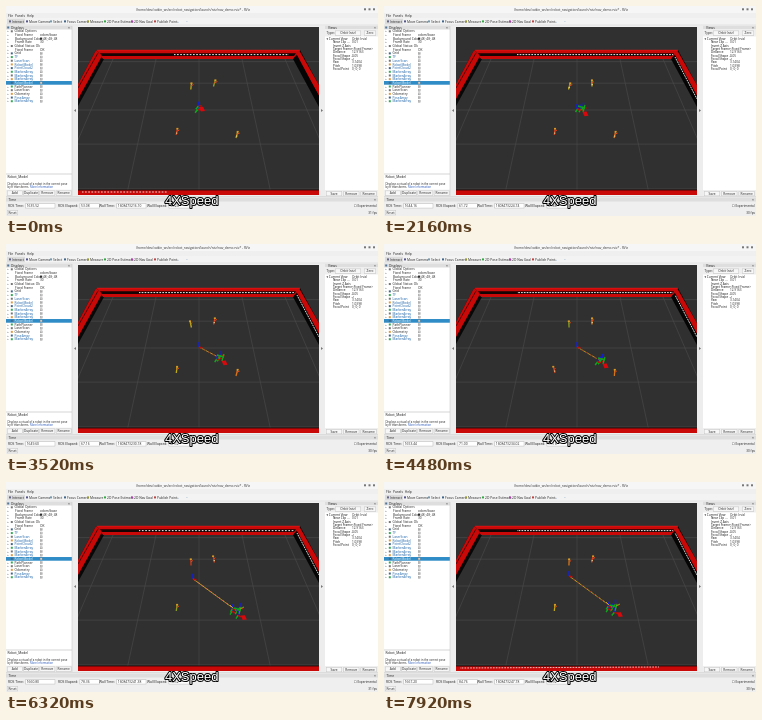
Write an HTML page with a canvas that moves like this. It is 372 px wide and 210 px high and loops after 8 s.

```html
<!DOCTYPE html>
<html lang="en">
<head>
<meta charset="utf-8">
<title>RViz session</title>
<style>
html, body { margin: 0; width: 100%; height: 100%; overflow: hidden; background: #efefef; }
canvas { display: block; width: 372px; height: 210px; }
</style>
</head>
<body>
<canvas id="stage" width="372" height="210"></canvas>
<script>
const ctx = document.getElementById('stage').getContext('2d');
const LOOP = 8000, STEP = 80;
const UI = '"Open Sans", "Noto Sans", sans-serif';
const RED = '#c90808', GREEN = '#10a51c', BLUE = '#1420c8';

function rect(x, y, w, h, color) {
  ctx.fillStyle = color;
  ctx.fillRect(x, y, w, h);
}
function poly(color, ...p) {
  ctx.fillStyle = color;
  ctx.beginPath();
  for (let i = 0; i < p.length; i += 2) ctx.lineTo(p[i], p[i + 1]);
  ctx.fill();
}
function line(x1, y1, x2, y2, color, width = 1, dash = []) {
  ctx.strokeStyle = color;
  ctx.lineWidth = width;
  ctx.setLineDash(dash);
  ctx.beginPath();
  ctx.moveTo(x1, y1);
  ctx.lineTo(x2, y2);
  ctx.stroke();
  ctx.setLineDash([]);
}
function text(s, x, y, color = '#222', size = 3.3, align = 'left') {
  ctx.font = `${size}px ${UI}`;
  ctx.textAlign = align;
  ctx.fillStyle = color;
  ctx.fillText(s, x, y);
}
function button(label, x, y, w) {
  rect(x, y, w, 5, '#c2c2c2');
  rect(x + .5, y + .5, w - 1, 4, '#f7f7f7');
  text(label, x + w / 2, y + 3.6, '#222', 3.2, 'center');
}
function field(label, value, x, w) {
  text(label, x, 201);
  const fx = x + ctx.measureText(label).width + 1.5;
  rect(fx, 197.3, w, 5, '#bbb');
  rect(fx + .5, 197.8, w - 1, 4, '#fff');
  text(value, fx + 1.5, 201);
}
function hash(n) {
  const v = Math.sin(n * 127.1 + 11.7) * 43758.5453;
  return v - Math.floor(v);
}
// Linear interpolation through rows of [time, ...values]
function track(rows, t) {
  let i = 0;
  while (i < rows.length - 2 && t > rows[i + 1][0]) i++;
  const a = rows[i], b = rows[i + 1];
  const u = Math.min(1, Math.max(0, (t - a[0]) / (b[0] - a[0])));
  return a.slice(1).map((v, k) => v + (b[k + 1] - v) * u);
}

const tree = [
  ['Global Options'], ['Fixed Frame', 'odom/base'], ['Background Color', '48; 48; 48'], ['Frame Rate', '30'],
  ['Global Status: Ok'], ['Fixed Frame', 'OK'], ['Grid', 1], ['TF', 1], ['LaserScan', 1], ['RobotModel', 1],
  ['PointCloud2', 1], ['MarkerArray', 1], ['MarkerArray', 1], ['MarkerArray', 1], ['RobotModel', 1],
  ['PathPlanner', 1], ['LaserScan', 1], ['Odometry', 1], ['PoseArray', 1], ['MarkerArray', 1]
];
const view = [
  ['Current View', 'Orbit (rviz)'], ['Near Clip ...', '0.01'], ['Invert Z Axis', ''], ['Target Frame', '<Fixed Frame>'],
  ['Distance', '12.9163'], ['Focal Shape ...', '0.05'], ['Focal Shape ...', '✓'], ['Yaw', '3.1404'],
  ['Pitch', '1.0398'], ['Focal Point', '0; 0; 0']
];

function drawChrome() {
  rect(0, 0, 372, 210, '#efefef');
  rect(0, 0, 372, 7, '#f6f6f6');
  text('/home/dev/catkin_ws/src/robot_navigation/launch/rviz/nav_demo.rviz* - RViz', 187, 4.5, '#333', 3.2, 'center');
  for (let i = 0; i < 3; i++) rect(358 + i * 4.5, 2.3, 2, 2, '#777');
  text('File  Panels  Help', 2, 10.7);
  rect(0, 12, 372, 7, '#f3f3f3');
  line(0, 19, 372, 19, '#d0d0d0', .5);
  rect(1, 12.7, 18, 5.6, '#dcdcdc');
  const tools = [[3, 'Interact'], [20, 'Move Camera'], [44, 'Select'], [58, 'Focus Camera'],
    [81, 'Measure'], [98, '2D Pose Estimate'], [125, '2D Nav Goal'], [148, 'Publish Point']];
  tools.forEach(([x, s], i) => {
    rect(x, 14.4, 2, 2, ['#668', '#558', '#79a', '#468', '#993', '#3a4', '#a4a', '#b44'][i]);
    text(s, x + 3, 16.8);
  });
  text('+', 171, 16.8, '#4674a4');
  text('−', 180, 16.8, '#4674a4');

  // Displays panel
  rect(0, 19.5, 66, 171, '#fff');
  rect(0, 19.5, 66, 4, '#dedede');
  rect(1.2, 20.5, 2, 2, '#579');
  text('Displays', 5, 22.7);
  text('×', 62, 22.7);
  tree.forEach(([name, value], i) => {
    const y = 26.4 + i * 3.68, chosen = i === 14;
    if (chosen) rect(0, y - 2.9, 66, 3.7, '#308cc6');
    const child = i > 0 && i < 4 || i === 5;
    const color = chosen ? '#fff' : i > 6 && i !== 15 && i !== 16 && i !== 17 ? '#1760a8' : '#222';
    text('▸', 1.5, y, '#777', 2.5);
    if (!child) rect(4.8, y - 2.1, 2, 2, ['#777', '#d94', '#468', '#3a5'][i % 4]);
    text(name, child ? 9 : 8.5, y, color, 3.2);
    if (value === 1) {
      rect(34, y - 2.3, 2.4, 2.4, '#8a8a8a');
      rect(34.4, y - 1.9, 1.6, 1.6, '#fff');
      line(34.6, y - 1, 35.8, y - 1, '#333', .5);
    } else if (value) {
      if (i === 2) rect(34, y - 2.2, 2.2, 2.2, '#303030');
      text(value, i === 2 ? 37 : 34, y, '#222', 3.2);
    }
  });
  line(0, 168, 66, 168, '#bbb', .6);
  text('Robot_Model', 1.5, 172.4, '#111', 3.3);
  text('Displays a visual of a robot in the correct pose', 1.5, 178.8, '#222', 2.8);
  text('by tf transforms.', 1.5, 182.4, '#222', 2.8);
  text('More Information', 24, 182.4, '#2554b8', 2.8);
  rect(0, 183.7, 66, 7, '#efefef');
  ['Add', 'Duplicate', 'Remove', 'Rename'].forEach((s, i) => button(s, 1 + i * 16.3, 184.6, 15.5));
  rect(66, 19.5, 6, 171, '#ededed');
  line(66, 20, 66, 190, '#c2c2c2', .5);
  poly('#777', 70, 103, 68, 104.5, 70, 106);

  // Views panel
  rect(313, 19.5, 6, 171, '#ededed');
  poly('#777', 315, 103, 317, 104.5, 315, 106);
  rect(319, 19.5, 53, 171, '#fff');
  rect(319, 19.5, 53, 4, '#dedede');
  text('Views', 322, 22.7);
  text('×', 368, 22.7);
  rect(319, 23.5, 53, 7, '#efefef');
  text('Type:', 320.5, 28.2);
  button('Orbit (rviz)', 329, 24.6, 26);
  button('Zero', 358, 24.6, 12);
  view.forEach(([name, value], i) => {
    const y = 33.9 + i * 3.35;
    text(i ? name : '▾ ' + name, i ? 327 : 320.5, y, '#111', 3.1);
    text(value, 346, y, '#222', 3.1);
  });
  rect(319, 184, 53, 6.5, '#efefef');
  ['Save', 'Remove', 'Rename'].forEach((s, i) => button(s, 320 + i * 17.3, 185.1, 16));
}

function drawFooter(k) {
  const e = 53.08 + k * .32;
  rect(0, 190, 372, 20, '#efefef');
  line(0, 190.5, 372, 190.5, '#c8c8c8', .5);
  rect(0, 191.5, 372, 4, '#dedede');
  text('Time', 2.5, 194.7);
  text('×', 368, 194.7);
  field('ROS Time:', (1582.44 + e).toFixed(2), 2, 30);
  field('ROS Elapsed:', e.toFixed(2), 52, 20);
  field('Wall Time:', (1608473216.1 + k * .32).toFixed(2), 93, 30);
  field('Wall Elapsed:', (e + .16).toFixed(2), 141, 24);
  rect(348, 198.5, 2.5, 2.5, '#999');
  rect(348.5, 199, 1.5, 1.5, '#fff');
  text('Experimental', 351.5, 201, '#222', 3.1);
  button('Reset', 1, 204.2, 11);
  text(`${30 + Math.round(hash(k) * 1.2)} fps`, 371, 207.8, '#222', 3.1, 'right');
}

function drawGrid() {
  const vanish = -146, span = 250, cell = 54;
  for (let n = -2; n <= 2; n++) {
    const s = cell * n / span;
    line(193 + s * (48 - vanish), 48, 193 + s * (188 - vanish), 188, '#4c4c4c', .6);
    const y = vanish + span / (1 + .12 * n);
    line(72, y, 313, y, '#4c4c4c', .6);
  }
}

function drawWalls(t, k) {
  poly('#080808', 90, 44, 98, 53, 72, 100, 72, 78);
  poly(RED, 90, 44, 96, 50, 72, 93, 72, 78);
  line(92, 47, 72, 82, '#350404', .8);
  poly('#050505', 294, 44, 287, 53, 313, 101, 313, 79);
  poly(RED, 293, 44, 290, 49, 313, 90, 313, 79);
  poly('#050505', 288, 52, 291, 49, 313, 90, 313, 98);
  poly(RED, 91, 44, 294, 44, 287, 53, 97, 53);
  poly('#160404', 94, 47.2, 290, 47.2, 288, 50, 96, 50);
  line(91, 44.2, 294, 44.2, '#ed1717', .6);
  rect(72, 184, 241, 5, RED);
  rect(72, 183.6, 241, .8, '#200404');

  const dash = [1.7, 1 + hash(k) * .7];
  ctx.lineDashOffset = hash(k + 3) * 2;
  const start = t < 1900 ? 168 : 133;
  line(start, 48.6, t < 1000 ? 283 : 289, 48.6, '#eee', 1, dash);
  if (t < 2000) {
    line(76, 186, 162, 186, '#eee', .9, dash);
  } else {
    line(291, 51, 313, 93, '#f4f4f4', .9, [1.8, .8]);
  }
  if (t > 7000) line(76, 186, 275, 185, '#eee', .8, dash);
  ctx.lineDashOffset = 0;
}

function drawMarker(x, y, id, k) {
  const seed = id * 31 + Math.floor((k + id) / 3);
  const colors = ['#d57718', '#bfaa18', '#8ca020', '#cc3f1c'];
  const color = colors[Math.floor(hash(seed) * 4)];
  const lean = (hash(seed + 5) - .5) * 3;
  line(x - lean, y - 3, x + lean * .4, y + 3.5, color, 1.3);
  rect(x - 1 - lean, y - 3.6, 2, 1.6, '#db9b22');
  line(x, y, x + 2 - lean, y - 1.5, '#e1481f', 1);
  if (hash(seed + 8) > .45) rect(x - .4, y + 1, 1.2, 1.2, '#ead39a');
}

const robotTrack = [[0, 193, 102], [1040, 193, 102], [2160, 197, 103], [3520, 214, 114],
  [4480, 217, 117], [6320, 231, 129], [7920, 229, 126]];
const originTrack = [[0, 193, 103], [4500, 193, 103], [6200, 187, 97], [7920, 185, 94]];

function drawRobot(t, k) {
  const [x, y] = track(robotTrack, t), [ox, oy] = track(originTrack, t);
  const [spread] = track([[0, .65], [1200, .7], [2200, 1], [4480, 1], [6320, 1.5], [8000, 1.5]], t);
  if (t > 2200) {
    line(ox, oy, x, y, '#b99422', 1);
    line(ox, oy, x, y, t > 5400 && t < 7000 ? '#c8604a' : '#8e321e', .9, [3, 2]);
    if (t > 5400) line(ox + 2, oy + 1, x, y, '#d5c7aa', .5, [1, 4]);
  }
  line(ox, oy, ox, oy - 5, BLUE, 1.5);
  line(ox, oy, ox + 3.5, oy + 1.2, RED, 1.4);
  const turn = track([[0, -.1], [1040, .2], [2160, .9], [3520, .5], [6320, .75], [8000, .65]], t)[0];
  const count = t > 4800 ? 5 : 3;
  for (let i = 0; i < count; i++) {
    const a = turn + i * 2.3;
    const px = x + Math.cos(a) * 3.4 * spread * (i > 0);
    const py = y + Math.sin(a) * 3 * spread * (i > 0);
    const wob = (hash(k + i * 13) - .5) * 1.2;
    line(px, py, px + wob, py - 4.5, BLUE, 1.5);
    line(px, py, px - 3 * Math.cos(turn) + wob, py + 3.2, GREEN, 1.5);
    line(px, py, px + 3.2, py + 2 * Math.sin(turn), RED, 1.4);
  }
  if (t > 1900) {
    line(x - 3, y - 3, x + 4, y - 1, GREEN, 1.4);
    line(x + 2, y + 3, x + 4, y - 4, GREEN, 1.3);
  }
  const rx = x + 4.5 * spread, ry = y + 1 + (t > 1900 ? 3.7 * spread : 0);
  poly('#d8090c', rx - 3, ry - 2, rx + 1.2, ry - 2.2, rx + 3, ry + 2, rx - 1, ry + 2.5);
  if (t > 5000) {
    line(x - 4, y - 3, x - 7, y - 6, '#c2a329', 1);
    line(x + 3, y - 2, x + 7, y - 4, '#79a623', 1);
  }
}

function drawScene(t, k) {
  ctx.save();
  ctx.beginPath();
  ctx.rect(72, 21, 241, 168);
  ctx.clip();
  rect(72, 21, 241, 168, '#303030');
  drawGrid();
  drawWalls(t, k);
  drawMarker(185, 80, 1, k);
  drawMarker(208, 77, 2, k);
  drawMarker(170.5, 125.5, 3, k);
  if (t < 5600) drawMarker(230.5, 128.5, 4, k);
  drawRobot(t, k);
  ctx.restore();
}

function drawCaption() {
  ctx.font = '13px "Liberation Sans", Arial, sans-serif';
  ctx.textAlign = 'center';
  ctx.lineJoin = 'round';
  ctx.lineWidth = 2;
  ctx.strokeStyle = '#000';
  ctx.strokeText('4XSpeed', 185.7, 199);
  ctx.fillStyle = '#fff';
  ctx.fillText('4XSpeed', 185.7, 199);
}

function frame(now) {
  const k = Math.floor(now % LOOP / STEP), t = k * STEP;
  drawChrome();
  drawScene(t, k);
  drawFooter(k);
  drawCaption();
  requestAnimationFrame(frame);
}
frame(0);
</script>
</body>
</html>
```
